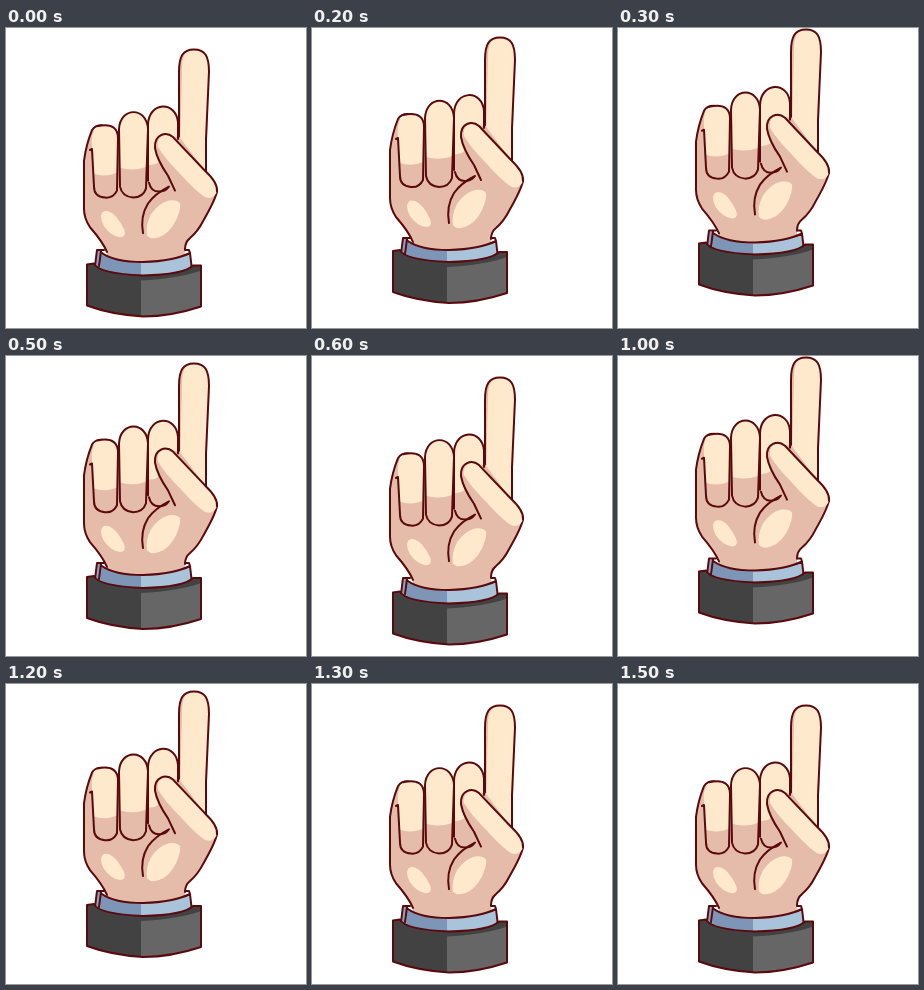
Write an HTML page that moves like this. It is 300 px wide and 300 px high and loops after 2.1 s.

```html
<!DOCTYPE html>
<html lang="en">
<head>
<meta charset="utf-8">
<title>Pointing hand</title>
<style>
html, body { margin: 0; width: 100%; height: 100%; overflow: hidden; background: #fff; }
svg { display: block; width: 100vw; height: 100vh; }
.line { fill: none; stroke: #5a090c; stroke-width: 2; stroke-linejoin: round; stroke-linecap: round; }
.light { fill: #ffe9cd; }
.shade { fill: #e5bcaa; }
</style>
</head>
<body>
<svg viewBox="0 0 300 300">
  <g id="hand">
    <!-- index finger -->
    <path class="shade" d="M174 110L173 32C173 16 177 9.5 188 9.5C199 9.5 203 16 203 32L200 135Z"/>
    <path class="light" d="M174 110L176 32C176 16 179 9.5 188 9.5C199 9.5 203 16 203 32L200 135Z"/>
    <path class="line" d="M173 104L173 32C173 16 177 9.5 188 9.5C199 9.5 203 16 203 32L200 100V133"/>

    <!-- palm -->
    <path class="shade" d="M101 235V212Q97 204 84 189Q78 180 78 170V122Q80 108 86 91L172 96L199 132Q212 144 211 153Q209 162 197 183Q192 193 184 200Q179 204 179 212V235Z"/>
    <path class="line" d="M101 214Q97 204 84 189Q78 180 78 170V122Q80 106 86 91Q89 86 96 86"/>
    <path class="line" d="M211 153Q209 162 197 183Q192 193 184 200Q179 204 179 211"/>

    <!-- curled fingers -->
    <path class="shade" d="M142 145V85C143 62 170 61 172 83V150Q152 160 142 145Z"/>
    <path class="light" d="M142 126V85C143 62 170 61 172 83V98L157 96L149 105L153 123Q148 127 142 126Z"/>
    <path class="line" d="M142 142V85C143 62 170 61 172 83V100M143 144Q145 153 153 153Q159 153 162 149"/>

    <path class="light" d="M86 108Q84 87 97 86C108 85 112 91 112 99L111 134Q99 139 88 135Z"/>
    <path class="line" d="M91 87C108 83 112 91 112 99L111 152Q107 160 99 159Q88 158 88 148L86 110L84 111"/>

    <path class="shade" d="M113 90C114 67 141 67 142 90L140 150Q137 159 127 159Q116 158 114 148Z"/>
    <path class="light" d="M113 90C114 67 141 67 142 90L141 128Q127 133 114 129Z"/>
    <path class="line" d="M113 90C114 67 141 67 142 90L140 150Q137 159 127 159Q116 158 114 148Z"/>

    <!-- thumb -->
    <path class="shade" d="M169 152L162 137Q151 121 149 109C148 95 160 92 167 98L199 132Q212 144 211 153L190 175Z"/>
    <path class="light" d="M152 108C150 97 160 93 167 98L199 132Q212 144 211 153Q208 161 200 159Q192 155 174 135Q159 120 152 108Z"/>
    <path class="line" d="M169 152L162 137Q151 121 149 109C148 95 160 92 167 98L199 132Q212 144 211 153"/>
    <path class="line" d="M163 148Q149 155 142 165Q134 178 137 195"/>

    <!-- palm highlights -->
    <path class="light" d="M95 178Q96 171 103 173Q111 176 118 191Q121 199 114 199Q105 198 98 188Q95 183 95 178Z"/>
    <path class="light" d="M174 165Q171 161 163 162Q152 165 145 176Q139 188 141 197Q144 202 153 199Q164 195 170 182Q175 171 174 165Z"/>
  </g>

  <g id="cuff">
    <path fill="#7d95b6" d="M95 211Q98 220 137 222V242H94Z"/>
    <path fill="#a9c4da" d="M135 222Q168 221 184 212L187 235H135Z"/>
    <path fill="#8ba3c3" d="M90 211H95V238H89Z"/>
    <path class="line" d="M89 226L91 210H98M95 211L93 226M96 213Q108 222 137 222Q168 221 184 213L186 230M179 210L183 210L184 213"/>
  </g>

  <g id="sleeve">
    <path fill="#424242" d="M81 223L88 222Q92 232 137 234Q178 233 187 224L195 224V265Q165 275 137 275Q105 273 81 264Z"/>
    <path fill="#666" d="M135 239Q172 237 195 229V265Q165 275 135 275Z"/>
    <path class="line" d="M81 223L88 222Q92 232 137 234Q178 233 187 224L195 224V265Q165 275 137 275Q105 273 81 264Z"/>
  </g>
</svg>

<script>
const $ = id => document.getElementById(id);
const LOOP = 2100;

// the hand as drawn spans these heights
const TIP = 9, WRIST = 212;

// heights of fingertip and wrist, then offsets of cuff and sleeve
const POSE = {
  rest:   [21, 222, 12, 13.5],
  settle: [24, 223.5, 12.5, 13],
  crouch: [27, 225, 13.5, 12.5],
  rise:   [9, 212, 0, 0],
  peak:   [1, 203.5, -7.5, -7.5],
  fall:   [7, 209, -3, -2]
};

const STEPS = [
  [0, 'rest'], [100, 'crouch'], [200, 'rise'], [300, 'peak'],
  [500, 'fall'], [600, 'rest'], [700, 'settle'],
  [800, 'crouch'], [900, 'rise'], [1000, 'peak'],
  [1200, 'fall'], [1300, 'rest'], [1400, 'settle'], [1500, 'rest']
];

function place(id, dy, scale = 1) {
  $(id).setAttribute('transform', `translate(0 ${dy}) scale(1 ${scale})`);
}

function draw(ms) {
  const name = STEPS.filter(s => s[0] <= ms).pop()[1];
  const [tip, wrist, cuff, sleeve] = POSE[name];
  const stretch = (wrist - tip) / (WRIST - TIP);
  place('hand', tip - TIP * stretch, stretch);
  place('cuff', cuff);
  place('sleeve', sleeve);
}

const start = performance.now();
function tick() {
  draw((performance.now() - start) % LOOP);
  requestAnimationFrame(tick);
}
tick();
</script>
</body>
</html>
```
